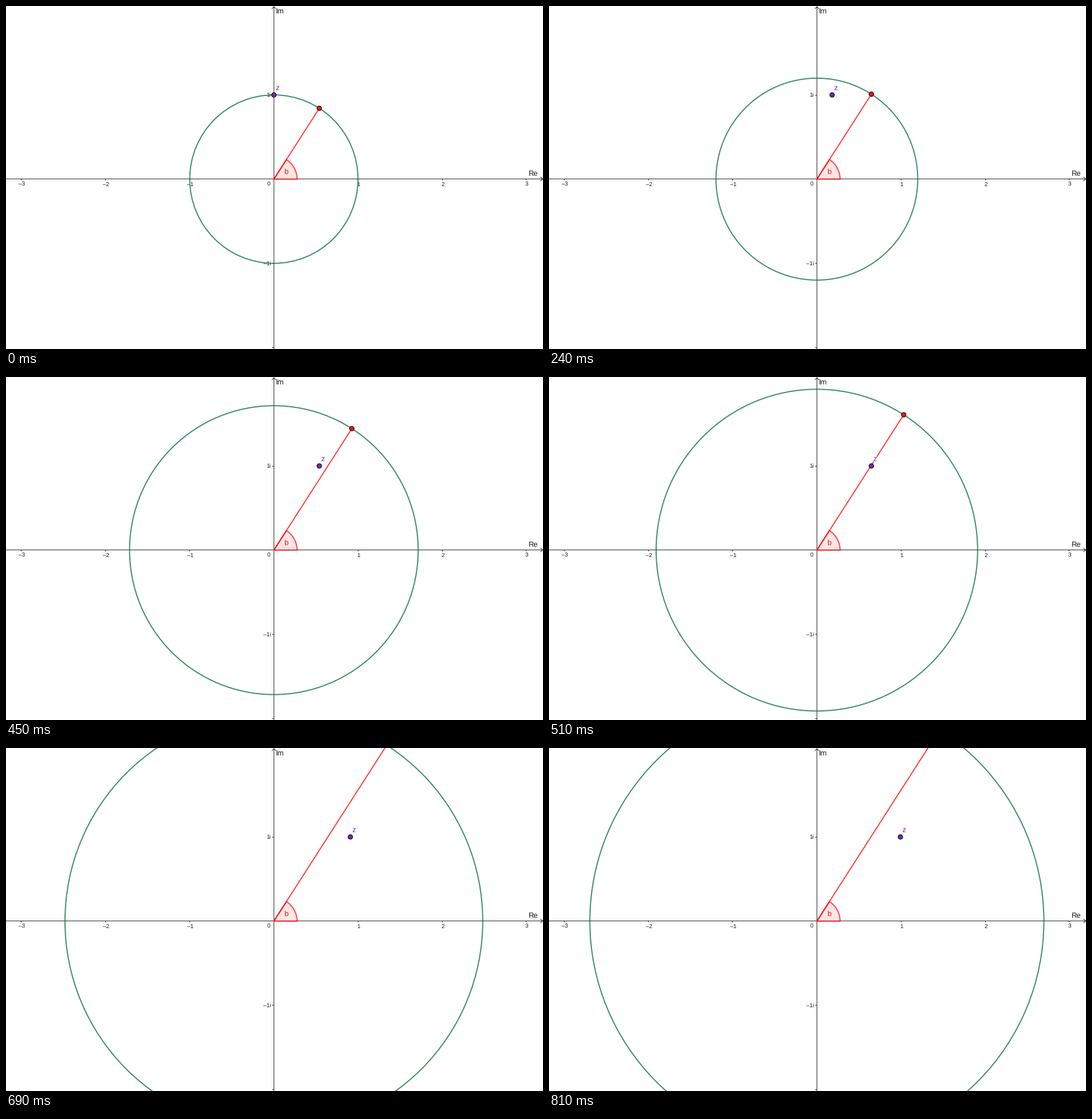
A matplotlib script for the animation above (0.84 s loop, 937 by 598 pixels).

```python
import math

import matplotlib.pyplot as plt
import matplotlib.patheffects as effects
from matplotlib.animation import FuncAnimation
from matplotlib.patches import Circle, Wedge

W, H, DPI = 937, 598, 64
PT = 72 / DPI                  # points per pixel
OX, OY, UNIT = 467.4, 301.85, 146.8
ANGLE = 1.0                    # radians
FRAMES, INTERVAL = 28, 30
PHASE_STEP = 0.11

BLACK, INK = "#252525", "#1a1a1a"
GREEN, RED, PURPLE = "#107545", "#ff0000", "#7424b4"

plt.rcParams["text.hinting"] = "none"
fig = plt.figure(figsize=(W / DPI, H / DPI), dpi=DPI, facecolor="white")
ax = fig.add_axes([0, 0, 1, 1])
ax.set_xlim(0, W)
ax.set_ylim(H, 0)
ax.axis("off")


def to_px(x, y):
    return OX + x * UNIT, OY - y * UNIT


def pixel_centre(v):
    return math.floor(v) + 0.5


def stroke(points, color=BLACK, width=1.0, **kw):
    xs, ys = zip(*points)
    return ax.plot(xs, ys, color=color, lw=width * PT, snap=False,
                   solid_capstyle="butt", **kw)[0]


def label(x, y, text, size, color=INK, ha="left", **kw):
    return ax.text(x, y, text.replace("-", "–"), fontsize=size * PT, color=color,
                   ha=ha, va="baseline", family="Liberation Sans", **kw)


def dot(color):
    return ax.add_patch(Circle((0, 0), 4, fc=color, ec="black", lw=PT,
                               snap=False, zorder=8))


def draw_axes():
    ax_x, ax_y = pixel_centre(OX), pixel_centre(OY)
    stroke([(0, ax_y), (W, ax_y)], zorder=1)
    stroke([(ax_x, 1), (ax_x, H)], zorder=1)
    stroke([(W - 4.5, ax_y - 3.5), (W - 0.5, ax_y), (W - 4.5, ax_y + 3.5)], zorder=1)
    stroke([(ax_x - 3.5, 5), (ax_x, 1), (ax_x + 3.5, 5)], zorder=1)

    for n in range(-3, 4):
        x = to_px(n, 0)[0]
        if n:
            tick = pixel_centre(x)
            stroke([(tick, ax_y), (tick, ax_y + 2.5)], zorder=1)
            label(x + 0.9, 314, f"{n}", 10, ha="center", zorder=2)
    label(458.7, 314, "0", 10, ha="center", zorder=2)

    for n in (1, -1, -2):
        y = pixel_centre(to_px(0, n)[1])
        stroke([(ax_x - 3, y), (ax_x, y)], zorder=1)
        if n > -2:
            label(462, y + 3, f"{n}i", 10, ha="right", zorder=2)

    label(471, 13, "Im", 13, zorder=2)
    label(912, 297, "Re", 13, zorder=2)


def draw_angle():
    degrees = math.degrees(ANGLE)
    # y runs downwards, so the sector opens towards negative angles
    ax.add_patch(Wedge((OX, OY), 40.5, -degrees, 0, fc=(1, 0, 0, 0.1),
                       ec=(1, 0, 0, 0.7), lw=2 * PT, snap=False, zorder=4))
    label(485.6, 293, "b", 13, color="#e81818", zorder=7)


draw_axes()
draw_angle()
ring = ax.add_patch(Circle((OX, OY), UNIT, fill=False, ec=GREEN, alpha=0.8,
                           lw=2 * PT, snap=False, zorder=3))
ray = stroke([(OX, OY), (OX, OY)], RED, 2, alpha=0.75, zorder=5)
image_dot = dot("#ea1616")
z_dot = dot(PURPLE)
z_label = label(0, 0, "z", 13, color=PURPLE, zorder=7)
z_label.set_path_effects([effects.withStroke(linewidth=2 * PT, foreground="white")])


def update(frame):
    real = (1 - math.cos(PHASE_STEP * frame)) / 2
    radius = math.exp(real)

    tip = to_px(radius * math.cos(ANGLE), radius * math.sin(ANGLE))
    ring.set_radius(radius * UNIT)
    ray.set_data([OX, tip[0]], [OY, tip[1]])
    image_dot.center = tip

    zx, zy = to_px(real, 1)
    z_dot.center = zx, zy
    z_label.set_position((zx + 3.5, zy - 8.5))
    return ring, ray, image_dot, z_dot, z_label


anim = FuncAnimation(fig, update, frames=FRAMES, interval=INTERVAL,
                     repeat=True, repeat_delay=0)
plt.show()
```
